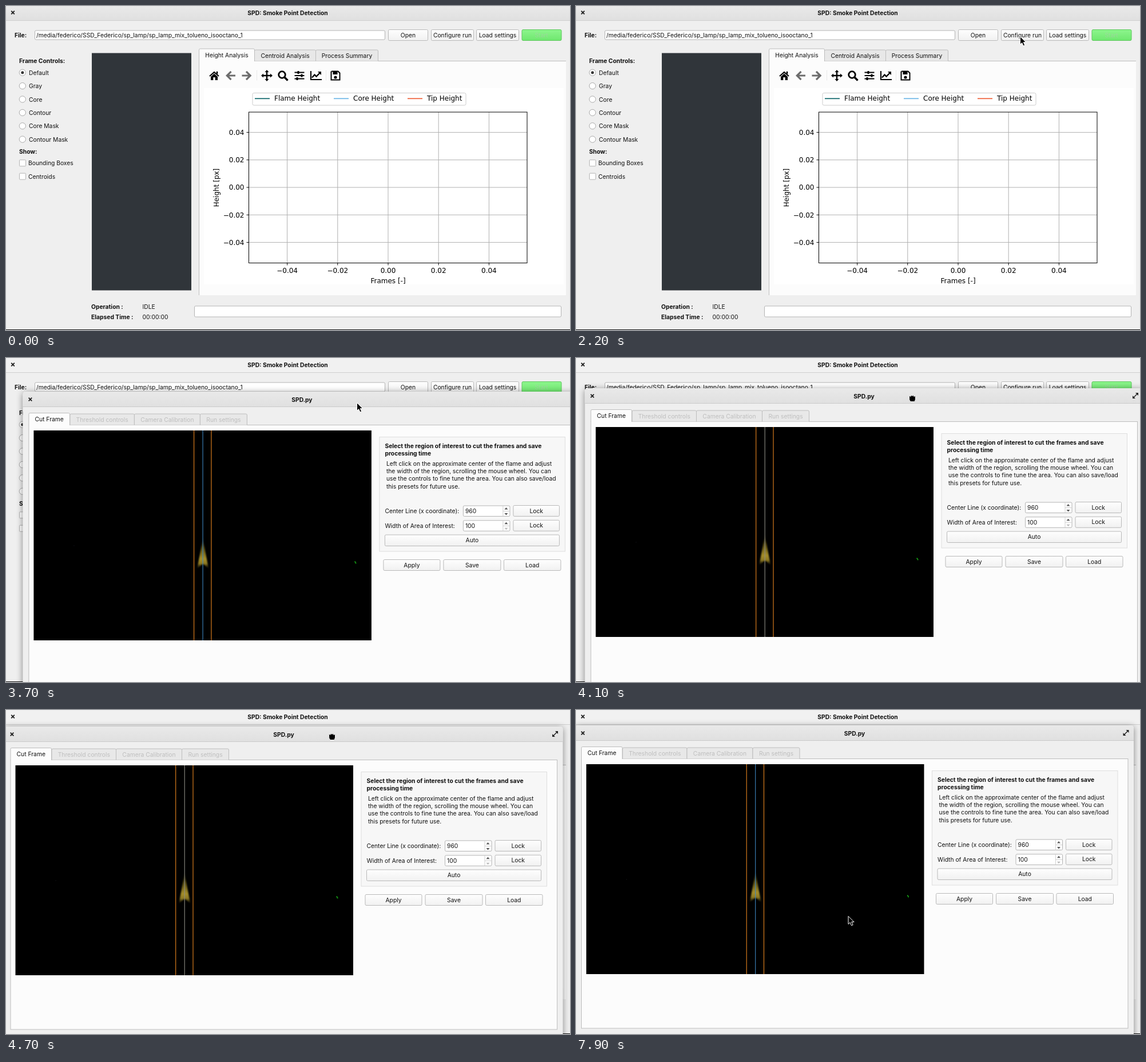
Write an HTML page that moves like this. It is 986 by 568 pixels and loops after 8 s.

```html
<!DOCTYPE html>
<html lang="en">
<head>
<meta charset="utf-8">
<title>SPD: Smoke Point Detection</title>
<style>
html, body { margin: 0; width: 100%; height: 100%; overflow: hidden; background: #efefef; }
svg { display: block; }
text { font: 10.3px Inter, sans-serif; fill: #111; white-space: pre; }
.b { font-weight: 700; }
.m { text-anchor: middle; }
.e { text-anchor: end; }
.off { fill: #bebebe; }
.plot { font: 12px "DejaVu Sans", sans-serif; fill: #000; }
</style>
</head>
<body>
<svg id="stage" width="986" height="568" viewBox="0 0 986 568"></svg>
<script>
const LOOP = 8000;
const stage = document.getElementById('stage');

// Drawing helpers: every one returns SVG markup.
const rect = (x, y, r, b, fill, line = 'none', rx = 0, more = '') =>
  `<rect x="${x}" y="${y}" width="${r - x}" height="${b - y}" rx="${rx}" fill="${fill}" stroke="${line}" ${more}/>`;
const path = (d, line = '#000', w = 1, fill = 'none', more = '') =>
  `<path d="${d}" stroke="${line}" stroke-width="${w}" fill="${fill}" ${more}/>`;
// y is the middle of the capitals
const text = (x, y, s, cls = '') => `<text x="${x}" y="${y + 3.7}" class="${cls}">${s}</text>`;
const plotText = (x, y, s, cls = '') => `<text x="${x}" y="${y + 4.4}" class="plot ${cls}">${s}</text>`;
const at = (x, y, body) => `<g transform="translate(${x} ${y})">${body}</g>`;
const button = (x, y, r, b, s, more = '') =>
  rect(x + .5, y + .5, r - .5, b - .5, 'url(#btn)', '#b9b9b9', 2, more) + text((x + r) / 2, (y + b) / 2 - .2, s, 'm');
const closeIcon = (x, y) => at(x, y, path('M-2.8-2.8L2.8 2.8M2.8-2.8L-2.8 2.8', '#222', 1.9));
const tab = (x, y, r, b, s, active, cls = '') =>
  path(`M${x} ${b}V${y + 2}q0-2 2-2H${r - 2}q2 0 2 2V${b}`, '#bdbdbd', 1, active ? '#fcfcfc' : '#e8e8e8') +
  text((x + r) / 2, (y + b) / 2 + .2, s, 'm ' + cls);

const gradient = (id, ...stops) => `<linearGradient id="${id}" x2="0" y2="1">` +
  stops.map(([o, c, a = 1]) => `<stop offset="${o}" stop-color="${c}" stop-opacity="${a}"/>`).join('') + '</linearGradient>';

const defs = '<defs>' +
  gradient('btn', [0, '#fefefe'], [1, '#f1f1f1']) +
  gradient('bar', [0, '#e9e9e9'], [1, '#e0e0e0']) +
  gradient('go', [0, '#8cf58c'], [1, '#6fe76f']) +
  gradient('flame', [0, '#302a08', 0], [.35, '#5a4e14'], [.7, '#a58e2a'], [.85, '#8c7822'], [1, '#4a3e10', .1]) +
  '</defs>';

function toolbar() {
  const head = a => `<path d="M-3.5-6L0-10 3.5-6Z" transform="rotate(${a})"/>`;
  const arrow = 'M8 0H-6M.5-7.2L-6.7 0 .5 7.2';
  return at(364, 122, path('M-8 1L0-6 8 1', '#000', 2.2) + path('M4-7h2v4h-2z', '#000', .5, '#000') +
      path('M-6 2L0-3.5 6 2V8H1.7V3H-1.7V8H-6Z', 'none', 0, '#000')) +
    at(393, 122, path(arrow, '#6c6c6c', 3.2)) +
    at(420.5, 122, `<g transform="scale(-1 1)">${path(arrow, '#6c6c6c', 3.2)}</g>`) +
    path('M438.5 113V131M559.5 113V131', '#d8d8d8', 1, 'none', 'stroke-dasharray="1 1"') +
    at(456, 122, path('M-8 0H8M0-8V8', '#000', 2.4) + [0, 90, 180, 270].map(head).join('')) +
    at(484, 122, '<circle cx="-1.5" cy="-1.5" r="5.8" fill="none" stroke="#000" stroke-width="2.8"/>' +
      path('M3 3L8.5 8.5', '#000', 3.4)) +
    at(513, 122, path('M-8.5-5.5H8.5M-8.5 0H8.5M-8.5 5.5H8.5', '#000', 1.8) +
      path('M-2-8v5M4-2.5v5M-4 3v5', '#000', 3)) +
    at(542, 122, path('M-9-8V7H10', '#000', 2) + path('M-7 3.5L-2.5-1.5 .5 1.5 7-5', '#000', 2.4) +
      path('M3-7H9V-1Z', 'none', 0, '#000')) +
    at(576, 122, path('M-7-7.5H4.5L7.5-4.5V7.5H-7.5V-7.5', '#000', 2, '#fff') +
      path('M-4.5-7H3.5V-2H-4.5Z', 'none', 0, '#000') + '<circle cy="3" r="2.6"/>');
}

function chart() {
  const label = v => (v < 0 ? '\u2212' : '') + (Math.abs(v) / 100).toFixed(2);
  let out = rect(346, 144, 975, 488, '#fff') + rect(431, 152.5, 804, 174, '#fff', '#ccc', 2.5);
  [['Flame', '#0b6468', 435], ['Core', '#6cb6e6', 573], ['Tip', '#ee6038', 702]].forEach(([s, c, x]) => {
    out += path(`M${x} 162.3h26`, c, 1.7) + plotText(x + 34, 162, s + ' Height');
  });
  for (let i = -2; i <= 2; i++) {
    const x = 668 + i * 88.2, y = 318 - i * 48.2;
    out += path(`M${x} 186V450M425 ${y}H911`, '#b0b0b0') +
      path(`M${x} 450v4.5M425 ${y}h-4.5`) +
      plotText(x, 464, label(i * 2), 'm') + plotText(416.5, y, label(i * 2), 'e');
  }
  return out + rect(424.5, 186, 911, 450.5, 'none', '#000') +
    plotText(668, 481.5, 'Frames [-]', 'm') +
    `<g transform="translate(368 318.5) rotate(-90)">${plotText(0, 0, 'Height [px]', 'm')}</g>`;
}

function mainWindow() {
  let out = rect(0, 0, 986, 568, '#efefef') + rect(0, 0, 986, 25, 'url(#bar)', 'none', 0, 'id="mainBar"') +
    path('M0 25.5H986', '#cfcfcf') + closeIcon(12, 11.5) + text(492.5, 12, 'SPD: Smoke Point Detection', 'b m') +
    text(15, 51, 'File:', 'b') + rect(50.5, 43, 662.5, 59, '#fff', '#b4b4b4', 2) +
    text(53, 51, '/media/federico/SSD_Federico/sp_lamp/sp_lamp_mix_tolueno_isooctano_1') +
    button(668, 41, 738, 61, 'Open') + button(743, 41, 818, 61, 'Configure run', 'id="configure"') +
    button(822, 41, 897, 61, 'Load settings') +
    rect(902, 41.5, 971, 60.5, 'url(#go)', '#5fc75f', 2) +
    `<g opacity=".45">${text(936, 51, 'Start', 'm off')}</g>` +
    text(23, 96.5, 'Frame Controls:', 'b');
  ['Default', 'Gray', 'Core', 'Contour', 'Core Mask', 'Contour Mask'].forEach((s, i) => {
    const y = 116.7 + i * 23.4;
    out += `<circle cx="28.8" cy="${y}" r="5.6" fill="#fff" stroke="#aaa"/>` + text(40, y + .3, s);
  });
  out += '<circle cx="28.8" cy="116.7" r="2.5" fill="#333"/>' + text(23, 255, 'Show:', 'b');
  ['Bounding Boxes', 'Centroids'].forEach((s, i) => {
    const y = 275.3 + i * 23.4;
    out += rect(23.5, y - 5.5, 34.5, y + 5.5, '#fff', '#b4b4b4', 1) + text(39, y + .3, s);
  });
  return out + rect(150, 82.5, 324, 498.5, '#30353a') +
    rect(337.5, 96.5, 979, 507, '#fcfcfc') + path('M979 96.5H337.5V507', '#bdbdbd') +
    tab(434.5, 77, 541.5, 96.5, 'Centroid Analysis') + tab(541.5, 77, 650.5, 96.5, 'Process Summary') +
    tab(337.5, 75, 434.5, 97, 'Height Analysis', true) +
    toolbar() + chart() +
    text(149, 527, 'Operation :', 'b') + text(238.5, 527, 'IDLE') +
    text(149, 545.5, 'Elapsed Time :', 'b') + text(238.5, 545.5, '00:00:00') +
    rect(329.5, 526, 970.5, 545, '#fff', '#b4b4b4', 2) + rect(0, 567, 986, 568, '#111');
}

function spin(y, label, value, downColor) {
  return text(632, y, label) + rect(769, y - 9.5, 850.5, y + 9, '#fff', '#b4b4b4', 2) +
    path(`M838.5 ${y - 9}V${y + 9}M838.5 ${y}H850`, '#d0d0d0') + text(772.5, y, value) +
    path(`M841 ${y - 3}l3-3.5 3 3.5z`, 'none', 0, '#555') + path(`M841 ${y + 3.5}l3 3.5 3-3.5z`, 'none', 0, downColor) +
    button(856, y - 10.5, 937.5, y + 9.5, 'Lock');
}

function dialog() {
  let out = path('M-1 600V32q0-5 5-5H970q5 0 5 5V600Z', 'none', 0, '#efefef',
      'style="filter:drop-shadow(0 2px 6px rgba(0,0,0,.45))"') +
    path('M-1 53V32q0-5 5-5H970q5 0 5 5V53Z', 'none', 0, 'url(#bar)') + path('M-1 53.5H975', '#cacaca') +
    closeIcon(12, 40.5) + text(487, 41, 'SPD.py', 'b m') +
    at(961.5, 40, path('M-4 4L4-4', '#222', 1.5) + path('M0-5H5V0ZM-5 0V5H0Z', 'none', 0, '#222')) +
    rect(9.5, 85.5, 965, 558, '#fcfcfc', '#bdbdbd') +
    tab(81.5, 66, 194, 85.5, 'Threshold controls', false, 'off') +
    tab(194, 66, 309, 85.5, 'Camera Calibration', false, 'off') +
    tab(309, 66, 391, 85.5, 'Run settings', false, 'off') +
    tab(9.5, 64.5, 81, 86, 'Cut Frame', true) +
    rect(18, 95, 608.5, 463, '#000') +
    path('M313.8 281C311 302 307 318 304 337L313.8 329 323.6 337C320.5 318 316.5 302 313.8 281Z', 'none', 0,
      'url(#flame)', 'style="filter:blur(.8px)"') +
    path('M298.2 95V463M328.5 95V463', '#e8851f', 1.1) + path('M313.7 95V463', '#3f86c0', 1.1, 'none', 'id="centerLine"') +
    path('M579 325l2 1M580 327.5h2', '#18b818', 1.4) + rect(88, 296.5, 89, 297.5, '#1c1c24') +
    rect(622.5, 106.5, 947, 307, '#f7f7f7', '#dedede') +
    text(632, 122, 'Select the region of interest to cut the frames and save', 'b') +
    text(632, 135.2, 'processing time', 'b');
  ['Left click on the approximate center of the flame and adjust',
    'the width of the region, scrolling the mouse wheel. You can',
    'use the controls to fine tune the area. You can also save/load',
    'this presets for future use.'].forEach((s, i) => out += text(634.5, 153.5 + i * 13.1, s));
  return out + spin(236.5, 'Center Line (x coordinate):', '960', '#555') +
    spin(262.3, 'Width of Area of Interest:', '100', '#bbb') +
    button(631.5, 277.5, 937.5, 298, 'Auto') + button(629, 321, 729, 341, 'Apply') +
    button(734, 321, 835, 341, 'Save') + button(839.5, 321, 940, 341, 'Load');
}

const pointer = path('M.5.5V14.4L3.7 11.5 6 16.8 8.6 15.7 6.3 10.6H10.6Z', '#fff', 1, '#000');
const hand = (id, top) => `<g id="${id}">` + path(
  `M-5.5 0V${top + 1}q1.3-2 2.6 0V${top}q1.4-2 2.8 0q1.4-2 2.8 0V${top + 1}q1.5-1.5 2.8 0V2Q5 6 3 6.5H-3Q-6 4-5.5 0Z`,
  '#fff', .9, '#000') + '</g>';

stage.innerHTML = defs + mainWindow() + `<g id="dialog">${dialog()}</g><g id="cursor">` +
  `<g id="pointer">${pointer}</g>${hand('fist', -3.5)}${hand('palm', -5.5)}</g>`;
const $ = id => document.getElementById(id);

// Tracks of [time, x, y]
const pointerTrack = [
  [400, 928, 156], [600, 893, 128], [800, 845, 96], [1000, 800, 68], [1200, 776, 55], [1300, 776, 53],
  [3000, 776, 53], [3100, 768, 56], [3400, 690, 70], [3700, 613, 78], [3800, 602, 72],
  [5300, 576, 39], [5600, 576, 40], [5700, 548, 48], [6000, 391, 90], [6100, 310, 115], [6200, 255, 142],
  [6300, 241, 168], [6400, 380, 195], [6500, 587, 213], [6600, 615, 226], [6700, 622, 250], [6900, 560, 318],
  [7100, 480, 362], [7300, 444, 376], [7400, 450, 377], [7500, 461, 387], [7600, 461, 387],
  [7700, 450, 383], [7800, 462, 372], [7900, 475.5, 361]];
const dialogTrack = [
  [3900, 30.4, 32], [4000, 27, 31], [4200, 6, 21], [4400, -4.3, 11.3], [4600, -3, 4], [4800, 0, 0]];

function follow(track, t) {
  const i = track.findIndex(k => k[0] > t);
  if (i < 0) return track.at(-1).slice(1);
  if (i === 0) return track[0].slice(1);
  const [t0, x0, y0] = track[i - 1], [t1, x1, y1] = track[i], f = (t - t0) / (t1 - t0);
  return [x0 + (x1 - x0) * f, y0 + (y1 - y0) * f];
}
const show = (id, on) => $(id).setAttribute('display', on ? 'inline' : 'none');
const move = (id, x, y, more = '') => $(id).setAttribute('transform', `translate(${x} ${y})${more}`);

function draw(now) {
  const t = Math.floor(now % LOOP / 100) * 100;
  const open = t >= 2300, dragging = t >= 4000 && t < 4900, palm = t >= 4900 && t < 5400;

  $('configure').setAttribute('fill', t === 2100 ? '#dcdcdc' : 'url(#btn)');
  $('mainBar').setAttribute('fill', open ? '#f1f1f1' : 'url(#bar)');

  const [dx, dy] = follow(dialogTrack, t);
  const [scale, alpha] = t < 2400 ? [.92, .6] : t < 2600 ? [.9905, .975] : [1, 1];
  show('dialog', open);
  $('dialog').setAttribute('opacity', alpha);
  move('dialog', dx, dy, ` translate(487 568) scale(${scale}) translate(-487 -568)`);
  $('centerLine').setAttribute('stroke', dragging ? '#8c8c84' : '#3f86c0');

  show('cursor', t >= 400);
  show('pointer', !dragging && !palm);
  show('fist', dragging);
  show('palm', palm);
  const [x, y] = dragging ? [571.5 + dx, 44 + dy] : palm ? [576, 43] : follow(pointerTrack, t);
  move('cursor', x, y);
}

const start = performance.now();
(function tick() {
  draw(performance.now() - start);
  requestAnimationFrame(tick);
})();
</script>
</body>
</html>
```
